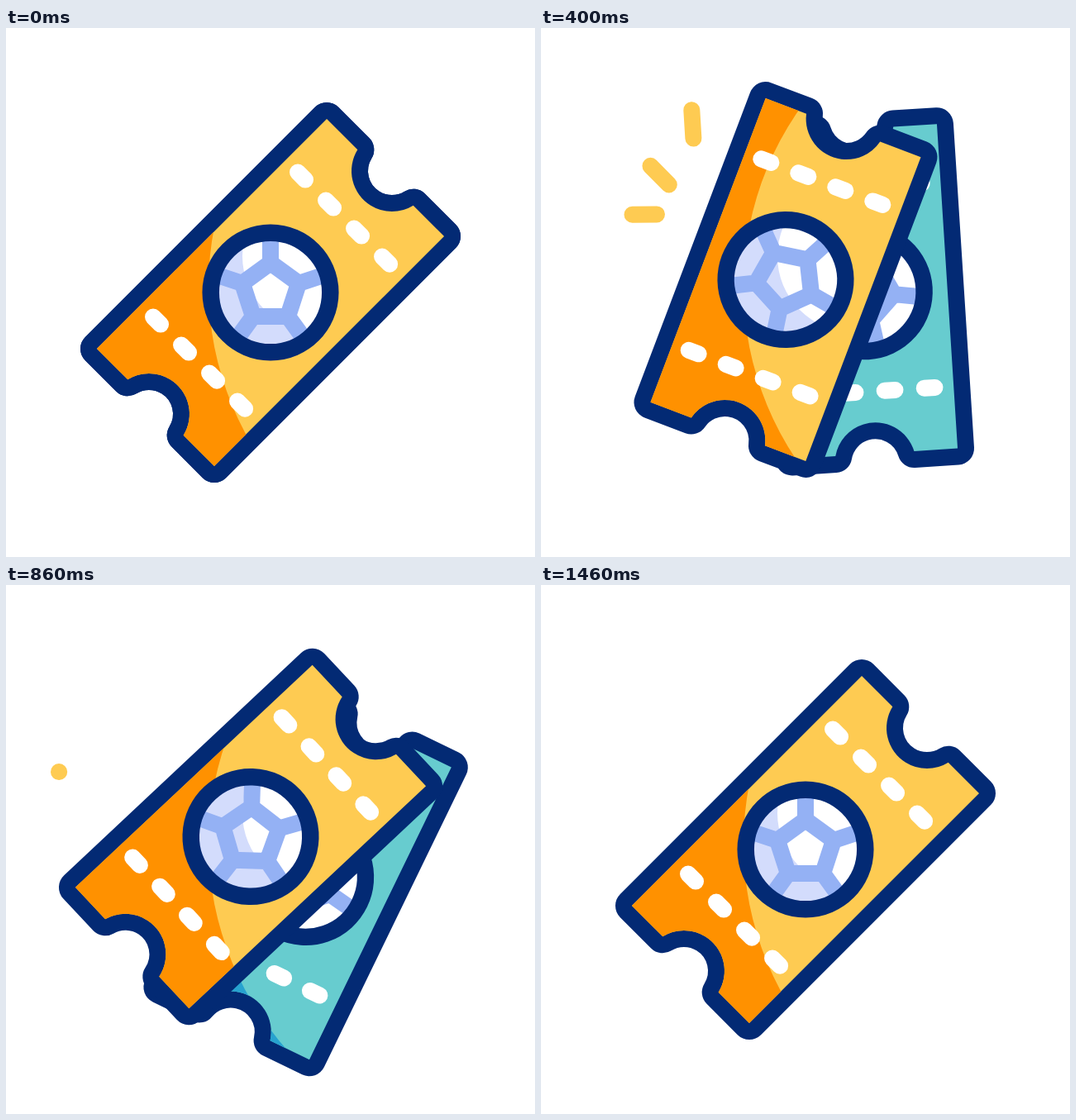
An HTML page with a canvas that plays this animation: 640x640 px, repeating every 1.8 s.

```html
<!DOCTYPE html>
<html lang="en">
<head>
<meta charset="utf-8">
<title>Tickets</title>
<style>
  html, body { margin: 0; width: 100%; height: 100%; overflow: hidden; background: #fff; }
  canvas { display: block; width: 100vmin; height: 100vmin; }
</style>
</head>
<body>
<canvas id="stage"></canvas>
<script>
const SIZE = 640, LOOP = 1800, TAU = Math.PI * 2;
const NAVY = '#032a74', YELLOW = '#fecb52', ORANGE = '#ff9100';
const TEAL = '#67cccf', BLUE = '#27a2cf', TINT = '#d3dcfc', SEAM = '#94b1f4';

const canvas = document.getElementById('stage');
const ctx = canvas.getContext('2d');
const scale = window.devicePixelRatio || 1;
canvas.width = canvas.height = SIZE * scale;

// Key tables: [ms, value], eased between neighbours.
const ANGLE = [[0, 45], [395, 20.7], [700, 56.9], [970, 41.2], [1240, 47], [1460, 45]];
const SPREAD = [[0, 0], [323, 24.4], [540, 24.4], [860, 20.9], [1040, 20.9], [1460, 0]];
const SHIFT = [[0, 0], [330, 1], [1000, 1], [1460, 0]];

// Rays: outward angle, inner and outer radius, grow and shrink times.
const RAY_CENTER = { x: 190, y: 225 };
const RAYS = [
  { angle: 266.5, from: 67, to: 126, grow: [205, 335], shrink: [330, 500] },
  { angle: 225.3, from: 50, to: 118, grow: [270, 550], shrink: [520, 680] },
  { angle: 179.5, from: 50, to: 126, grow: [300, 560], shrink: [480, 862] }
];

const HALF_W = 100.4, HALF_H = 196.6, NOTCH_Y = 207.9, NOTCH_R = 49, PIVOT = 228;

const rad = deg => deg * Math.PI / 180;
const progress = (t, [a, b]) => Math.min(1, Math.max(0, (t - a) / (b - a)));

function sample(keys, t) {
  for (let i = 1; i < keys.length; i++) {
    const [t0, v0] = keys[i - 1], [t1, v1] = keys[i];
    if (t < t1) {
      const p = (t - t0) / (t1 - t0);
      return v0 + (v1 - v0) * p * p * (3 - 2 * p);
    }
  }
  return keys[keys.length - 1][1];
}

function makeTicket() {
  const path = new Path2D();
  const a = Math.asin((NOTCH_Y - HALF_H) / NOTCH_R);
  path.moveTo(-HALF_W, -HALF_H);
  path.arc(0, -NOTCH_Y, NOTCH_R, Math.PI - a, a, true);
  path.lineTo(HALF_W, -HALF_H);
  path.lineTo(HALF_W, HALF_H);
  path.arc(0, NOTCH_Y, NOTCH_R, -a, Math.PI + a, true);
  path.lineTo(-HALF_W, HALF_H);
  path.closePath();
  return path;
}

function makeDashes() {
  const path = new Path2D();
  for (const y of [-126.2, 121.3]) {
    for (let i = 0; i < 4; i++) {
      const x = -73.1 + 48.1 * i;
      path.moveTo(x - 6.4, y);
      path.lineTo(x + 6.4, y);
    }
  }
  return path;
}

// The ball stands upright when the ticket leans at its resting 45 degrees.
function makeSeams() {
  const path = new Path2D();
  const at = (i, r) => {
    const a = rad(-135 + 72 * i);
    return [r * Math.cos(a), r * Math.sin(a)];
  };
  for (let i = 0; i < 5; i++) path.lineTo(...at(i, 35.8));
  path.closePath();
  for (let i = 0; i < 5; i++) {
    path.moveTo(...at(i, 35.8));
    path.lineTo(...at(i, 66));
  }
  return path;
}

function disc(x, y, r) {
  const path = new Path2D();
  path.arc(x, y, r, 0, TAU);
  return path;
}

function outside(x, y, r) {
  const path = new Path2D();
  path.rect(-SIZE, -SIZE, SIZE * 3, SIZE * 3);
  path.addPath(disc(x, y, r));
  return path;
}

const TICKET = makeTicket(), DASHES = makeDashes(), SEAMS = makeSeams();
const BALL = disc(0, 0, 64), RING = disc(0, 0, 72.3);

// The shading stays still on the stage while the tickets turn through it.
const TICKET_SHADE = outside(620, 313, 375);
const BALL_SHADE = outside(378, 276, 92);

const toStage = () => ctx.setTransform(scale, 0, 0, scale, 0, 0);

function stroke(path, color, width) {
  ctx.strokeStyle = color;
  ctx.lineWidth = width;
  ctx.stroke(path);
}

function fill(path, color) {
  ctx.fillStyle = color;
  ctx.fill(path);
}

function shade(shape, area, color) {
  ctx.save();
  ctx.clip(shape);
  toStage();
  ctx.fillStyle = color;
  ctx.fill(area, 'evenodd');
  ctx.restore();
}

function drawTicket(light, dark, ballTint) {
  ctx.lineJoin = 'round';
  ctx.lineCap = 'round';
  stroke(TICKET, NAVY, 40);
  fill(TICKET, light);
  shade(TICKET, TICKET_SHADE, dark);
  stroke(DASHES, '#fff', 20);

  fill(BALL, '#fff');
  if (ballTint) shade(BALL, BALL_SHADE, ballTint);
  ctx.lineJoin = 'miter';
  ctx.lineCap = 'butt';
  stroke(SEAMS, SEAM, 20);
  stroke(RING, NAVY, 20.5);
}

function drawRay(ray, t) {
  const span = ray.to - ray.from;
  const start = ray.from + span * progress(t, ray.shrink);
  const end = ray.from + span * progress(t, ray.grow);
  if (end <= start) return;
  const c = Math.cos(rad(ray.angle)), s = Math.sin(rad(ray.angle));
  const line = new Path2D();
  line.moveTo(RAY_CENTER.x + start * c, RAY_CENTER.y + start * s);
  line.lineTo(RAY_CENTER.x + end * c, RAY_CENTER.y + end * s);
  ctx.lineCap = 'round';
  stroke(line, YELLOW, 20);
}

function draw(t) {
  const shift = sample(SHIFT, t), spread = sample(SPREAD, t);
  toStage();
  ctx.fillStyle = '#fff';
  ctx.fillRect(0, 0, SIZE, SIZE);
  RAYS.forEach(ray => drawRay(ray, t));

  ctx.translate(320 - 24 * shift, 320 - 15.5 * shift);
  ctx.rotate(rad(sample(ANGLE, t)));
  if (spread > 0) {
    ctx.save();
    ctx.translate(0, -PIVOT);
    ctx.rotate(rad(-spread));
    ctx.translate(0, PIVOT);
    drawTicket(TEAL, BLUE);
    ctx.restore();
  }
  drawTicket(YELLOW, ORANGE, TINT);
}

function tick() {
  draw(performance.now() % LOOP);
  requestAnimationFrame(tick);
}
tick();
</script>
</body>
</html>
```
